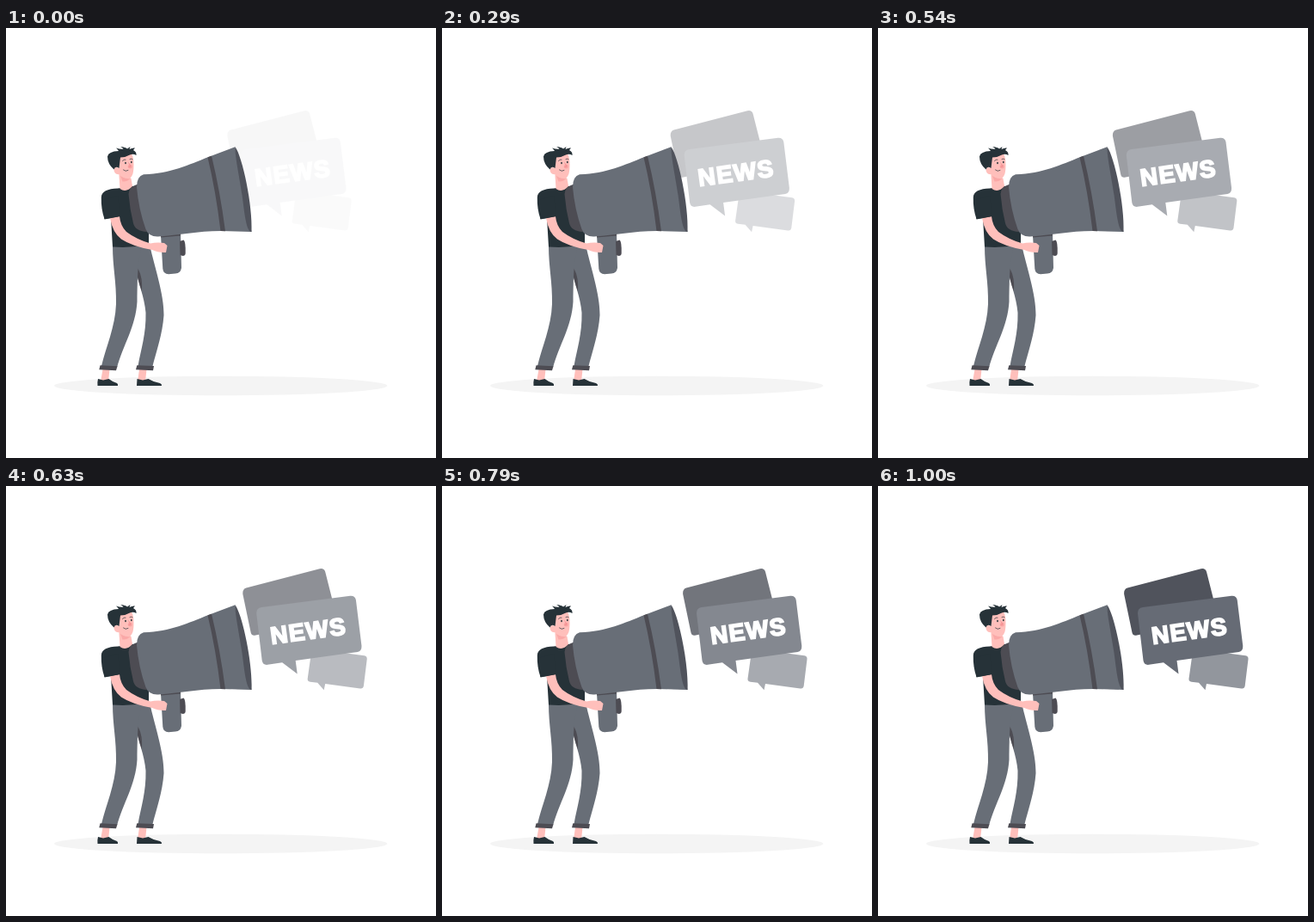
Animation, 500 px wide and 500 px high, one loop 1.04 s. Source, as an HTML page:

```html
<!DOCTYPE html>
<html lang="en">
<head>
<meta charset="utf-8">
<title>News megaphone</title>
<style>
  html, body { margin: 0; width: 100%; height: 100%; overflow: hidden; background: #fff; }
  svg { display: block; width: 100%; height: 100%; }
  .ink { fill: #263238; }
  .grey { fill: #686e77; }
  .dark { fill: #4d4c53; }
  .skin { fill: #ffbfbb; }
  .line { fill: none; stroke: #263238; stroke-width: .7; stroke-linecap: round; }
  text { font: bold 28px "Liberation Sans", Arial, sans-serif; letter-spacing: 1.3px;
         fill: #fff; stroke: #fff; stroke-width: 1.8; }
</style>
</head>
<body>
<svg viewBox="0 0 500 500">
  <ellipse cx="249.7" cy="416" rx="193.7" ry="11.3" fill="#f4f4f4"/>

  <g id="bubbles">
    <path fill="#50535c" d="M290 118.500L375.500 96.300Q380.500 95.200 382 99.700L396 155L301 173.500Q296.500 174.500 295.500 170.500L286.200 126Q285.500 120 290 118.500Z"/>
    <path fill="#92969d" d="M369 189.500L427.500 197.300Q431 198 430.500 201.500L426.700 232.500Q426 236 422.500 235.400L382 230L380.500 237.300L373 228.800L364.500 227.700Q361 227 361.500 224L366 192Q366.500 189.200 369 189.500Z"/>
    <path fill="#666b75" d="M308 141L411 127.800Q416.700 127.300 417.700 132.500L424.300 186Q424.500 192 419.500 193L347.500 203L349.500 218.500L332 205.300L315 207.800Q309.500 208.500 308.500 203L302 148Q301.800 142 308 141Z"/>
    <text transform="translate(319.500 184) rotate(-7.700)">NEWS</text>
  </g>

  <!-- legs and shoes -->
  <path class="skin" d="M112.500 397H120.500L119 411H110ZM155 397H163.500L162 411H153Z"/>
  <path class="ink" d="M107 408Q110 408.500 113 409.500L119.500 408Q124 411.500 129 413Q130.500 414 130 416H106.500Q106 412 107 408ZM152.500 408Q156 408.500 159 409.500L165.500 408Q171 411.500 179 413Q181.500 414 181 416H152Z"/>
  <path class="grey" d="M141 254H167.500C172 275 184 310 183.500 334C182 356 175 375 170 395L153.500 393C157 373 163 356 162.500 331C161 313 154 297 150 278Z"/>
  <path class="dark" d="M151 277L154 281Q159 290 158 306Q153 294 151 277Z"/>
  <path class="grey" d="M124 253.500L158 254C153 273 153 285 152.500 318C151 347 136 369 129 395L111 393C116 371 127 348 128 321C128.500 295 124 278 124 253.500Z"/>
  <path class="dark" d="M109.500 392.300L129.500 393.300L128 398.300L108.300 397.300ZM152.300 392.300L172 393L171 398.300L151 397.300Z"/>

  <!-- torso and head -->
  <path class="ink" d="M130 186.500C118 187 111 190 110.800 197Q110.500 211 114.500 222L122 221L124 254.500Q146 256 166 252V236L153 183.500L146 184Z"/>
  <path class="skin" d="M131 164L132.500 187Q140 192 147 184L145.500 175Z"/>
  <path fill="#f79a9a" d="M133 172Q138 176 144.500 175Q141 179 135.500 178.500Z" opacity=".6"/>
  <path class="skin" d="M131 162C132 171 137 175.500 142.500 175C147.500 174 148.500 167 148.500 159Q148.500 151 146 146L132 149Z"/>
  <path class="skin" d="M132 163Q126 160 125.500 165Q126 171 132 170Z"/>
  <path class="ink" d="M118 149.500Q119 143.500 131 143Q129.500 140.500 128 139.500Q134 141.500 136.500 140.500Q135 138.500 133 138Q139 138.500 141 140.500L144.500 138L143.500 141Q147 139 150 139.500L148 142Q152 144 151.500 148Q148 146 144 147.500Q139 150.500 133 150.500L131.500 163Q127 160 125.500 164.500Q118 158 118 149.500Z"/>
  <circle cx="144.300" cy="161" r="2.500" fill="#f79a9a" opacity=".7"/>
  <ellipse class="ink" cx="139" cy="157" rx=".8" ry="1.200"/>
  <ellipse class="ink" cx="145.800" cy="156" rx=".8" ry="1.200"/>
  <path class="line" d="M135.500 154.500Q137 152.500 139 153M144 152.500Q145.500 151.500 147 152.500M136.500 165Q139 167.500 142 165.500"/>
  <path d="M142.500 156.500L145 161L142.500 161.500" fill="none" stroke="#f07f84" stroke-width=".6"/>

  <!-- megaphone -->
  <path class="dark" d="M155 181Q143 184 142.500 193Q144 211 148 227Q150 236 164 237Z"/>
  <path class="grey" d="M180 241L203 238L204 279Q203 285 197 285.500L189 286.200Q183 286 182.300 280Z"/>
  <path class="dark" d="M180 241L203 238V241.500L180.200 243.500Z"/>
  <path class="dark" d="M202 248L206.500 246.500Q209 248 208.700 262Q208.500 265 205.500 265L202.500 264Z"/>
  <path class="grey" d="M160 170.300C192 169 211 159.500 236 149.700L266.500 138.300L285.500 237L250 236C222 236 202 241 177 242.500Q166 243 162.500 234Q154 210 152 185Q152 172.500 160 170.300Z"/>
  <path class="dark" d="M234.500 150.300L239 148.700Q249 190 255 236.200L249.500 236Q244 190 234.500 150.300Z"/>
  <path fill="#50535c" d="M266.500 138.300C275 150 287 207 285.500 237C279 237 277 212 274.500 194C271 171 266 148 266.500 138.300Z"/>

  <!-- arm -->
  <path class="skin" d="M121 221L132 219Q133 230 140 237Q152 246 168 250.500Q175 249 184 250L187.500 253L186 261Q177 261.500 170 258Q147 254 134 245.500Q124 238 121 221Z"/>
  <path class="ink" d="M112 200L130 195L133 219L114.500 222.500Z"/>
</svg>
<script>
  const LOOP = 1040, STEPS = 25, STEP = 1000 / 24, SHIFT = 30;
  const bubbles = document.getElementById("bubbles");
  const start = performance.now();

  function draw() {
    const t = (performance.now() - start) % LOOP;
    const step = Math.min(STEPS - 1, Math.floor((t + 5) / STEP));
    const p = (step + 1) / STEPS;
    bubbles.setAttribute("transform", `translate(${SHIFT * (p - 1)} 0)`);
    bubbles.setAttribute("opacity", p);
    requestAnimationFrame(draw);
  }
  draw();
</script>
</body>
</html>
```
